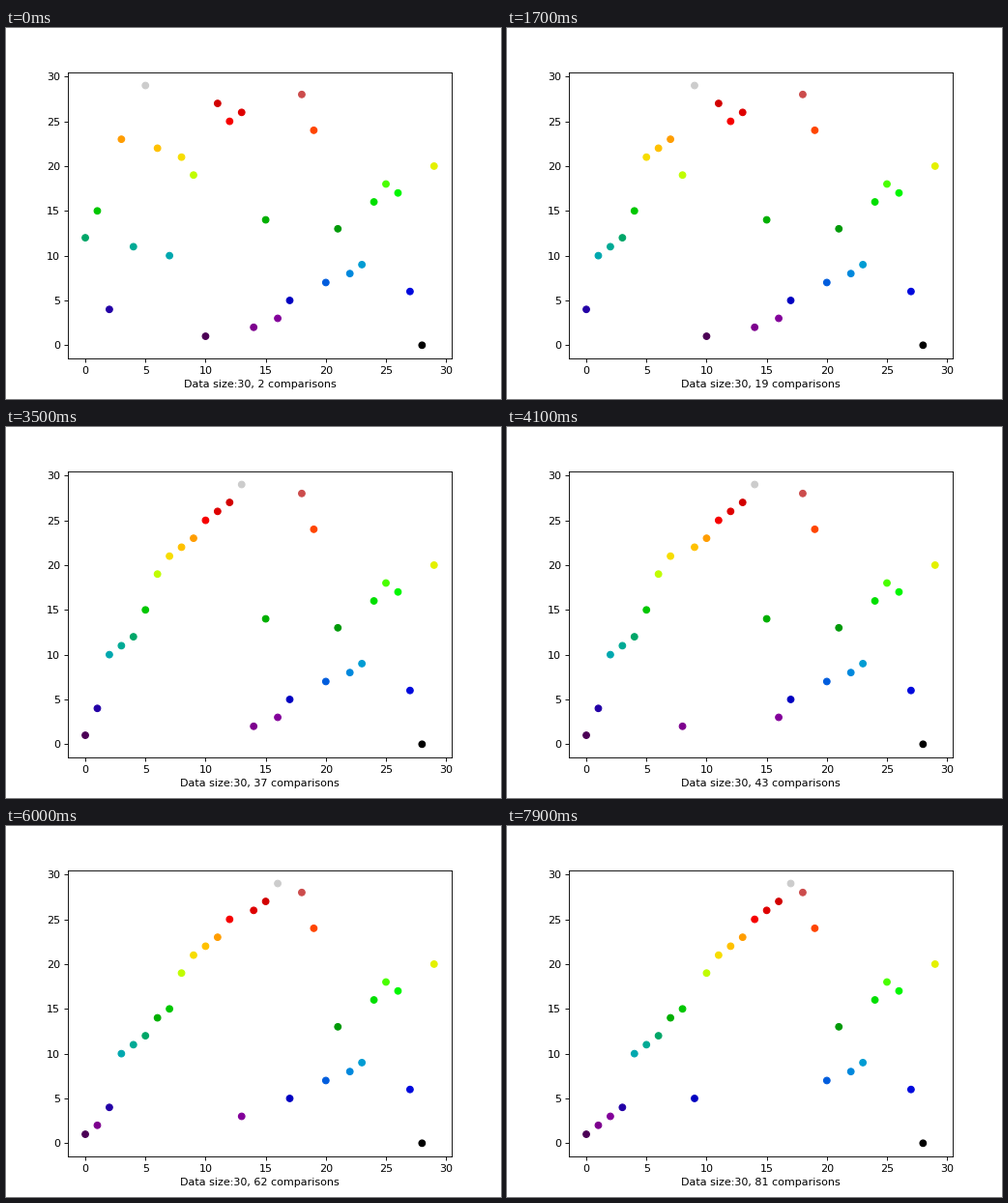
A matplotlib script that plays this animation: 512 px wide and 384 px high, repeating every 8000 ms.

```python
import matplotlib.pyplot as plt
import numpy as np
from matplotlib.animation import FuncAnimation

FRAMES = 80
INTERVAL = 100
# The shuffled input; every later position follows from sorting it.
DATA = [12, 15, 4, 23, 11, 29, 22, 10, 21, 19, 1, 27, 25, 26, 2,
        14, 3, 5, 28, 24, 7, 13, 8, 9, 16, 18, 17, 6, 0, 20]


def insertion_steps(values):
    """Yield the list before the first swap and after every swap."""
    a = list(values)
    yield a[:]
    for i in range(1, len(a)):
        j = i
        while j > 0 and a[j] < a[j - 1]:
            a[j], a[j - 1] = a[j - 1], a[j]
            j -= 1
            yield a[:]


steps = list(insertion_steps(DATA))[:FRAMES]
size = len(DATA)
xs = np.arange(size)

plt.rcParams["text.kerning_factor"] = 6  # kerning in whole pixels
fig, ax = plt.subplots(figsize=(6.4, 4.8), dpi=80)
dots = ax.scatter(xs, DATA, c=DATA, cmap="nipy_spectral", vmin=0, vmax=size - 1)
pad = 0.05 * (size - 1)
ax.set_xlim(-pad, size - 1 + pad)
ax.set_ylim(-pad, size - 1 + pad)
label = ax.set_xlabel("")


def update(k):
    values = np.array(steps[k])
    dots.set_offsets(np.column_stack([xs, values]))
    dots.set_array(values)
    label.set_text(f"Data size:{size}, {k + 2} comparisons")
    return dots, label


anim = FuncAnimation(fig, update, frames=FRAMES, interval=INTERVAL,
                     init_func=lambda: update(0), repeat=True, repeat_delay=0)
plt.show()
```
